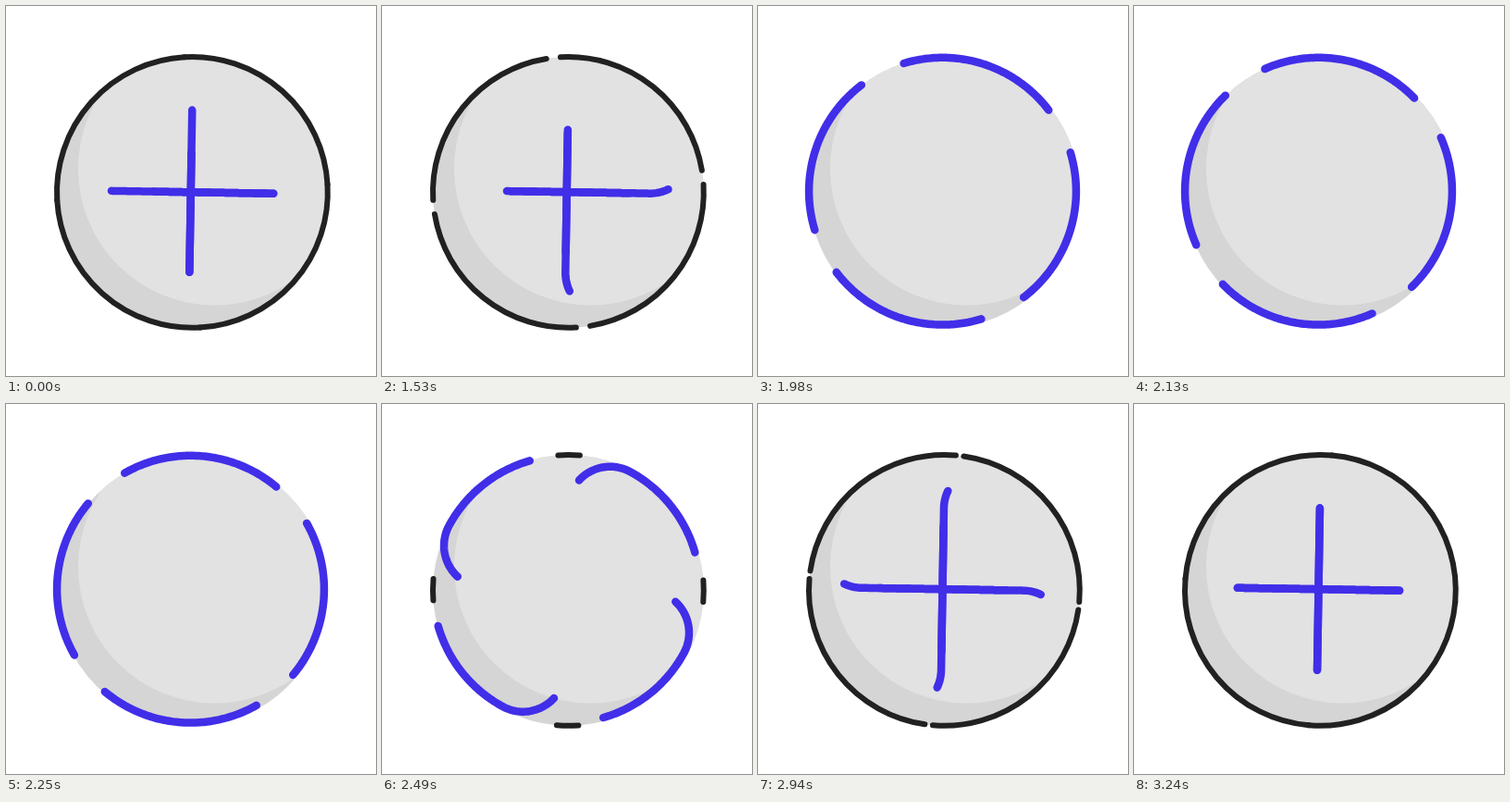
Animation of 400 by 400 pixels, one loop 3390 ms. Source, as an HTML page with a canvas:

```html
<!DOCTYPE html>
<html lang="en">
<head>
<meta charset="utf-8">
<title>Plus</title>
<style>
html, body { margin: 0; width: 100%; height: 100%; overflow: hidden; background: #fff; }
canvas { display: block; width: 400px; height: 400px; }
</style>
</head>
<body>
<canvas id="stage" width="400" height="400"></canvas>
<script>
const ctx = document.getElementById('stage').getContext('2d');
const LOOP = 3390, STEP = 30, HOLD = 1500, MOVE = 1740;
const TAU = Math.PI * 2, DEG = Math.PI / 180;
const BLUE = '#412ee8', INK = '#222122', FACE = '#e2e2e2', SHADE = '#d5d5d5';

// Closed track: a straight bar, a small bend, a rim arc and a bend back.
const CX = 199.5, CY = 200.2, RIM = 144.4, HALF = 87.6, TILT = 0.95 * DEG;
const BEND = (RIM * RIM - HALF * HALF) / (2 * RIM);
const JOIN = Math.atan2(BEND, HALF);
const BEND_LEN = BEND * (Math.PI / 2 + JOIN);
const ARC_LEN = RIM * (Math.PI - 2 * JOIN);
const TRACK = 2 * HALF + 2 * BEND_LEN + ARC_LEN;

const MID = 201.4, RING = 146.4;

// Keys: [time, value, speed]
const TRAVEL = [[0, 0, 0.7], [30, 21.2, 0.8], [480, 296, 0.2], [750, 328, 0.2],
  [990, 468.9, 0.8], [1260, 623.6, 0.25], [MOVE, TRACK, 0.005]];
const ERASE = [[0, 0, 0.2], [30, 6, 0.2], [390, 90, 0.2]];
const GROW = [[900, 0, 0], [990, 9.2, 0.2], [1260, 69.8, 0.15], [1620, 90, 0]];

const clamp = x => Math.max(0, Math.min(1, x));

function curve(keys, t) {
  if (t <= keys[0][0]) return keys[0][1];
  for (let i = 1; i < keys.length; i++) {
    const [t0, a, va] = keys[i - 1], [t1, b, vb] = keys[i];
    if (t > t1) continue;
    const d = t1 - t0, s = (t - t0) / d, r = 1 - s;
    return r * r * ((1 + 2 * s) * a + s * d * va) + s * s * ((1 + 2 * r) * b - r * d * vb);
  }
  return keys[keys.length - 1][1];
}

function bendPoint(q) {
  const a = q / BEND;
  return [HALF + BEND * Math.sin(a), BEND * (Math.cos(a) - 1)];
}

function trackPoint(p) {
  p = ((p + HALF) % TRACK + TRACK) % TRACK;
  if (p < 2 * HALF) return [p - HALF, 0];
  p -= 2 * HALF;
  if (p < BEND_LEN) return bendPoint(p);
  p -= BEND_LEN;
  if (p < ARC_LEN) {
    const a = JOIN + p / RIM;
    return [RIM * Math.cos(a), -RIM * Math.sin(a)];
  }
  const [x, y] = bendPoint(BEND_LEN - (p - ARC_LEN));
  return [-x, y];
}

function strand(turn, tail, head, dx, dy) {
  ctx.save();
  ctx.translate(CX + dx, CY + dy);
  ctx.rotate(turn * Math.PI / 2 + TILT);
  ctx.beginPath();
  const n = 90;
  for (let i = 0; i <= n; i++) ctx.lineTo(...trackPoint(tail + (head - tail) * i / n));
  ctx.stroke();
  ctx.restore();
}

function disc(x, y, r, color) {
  ctx.fillStyle = color;
  ctx.beginPath();
  ctx.arc(x, y, r, 0, TAU);
  ctx.fill();
}

function face() {
  disc(MID, MID, RING, SHADE);
  ctx.save();
  ctx.beginPath();
  ctx.arc(MID, MID, RING, 0, TAU);
  ctx.clip();
  disc(225.5, 176, 147.5, FACE);
  ctx.restore();
}

// Four equal outline pieces, angles counter-clockwise in degrees.
function outline(from, to) {
  if (to - from <= 0) return;
  for (let k = 0; k < 4; k++) {
    ctx.beginPath();
    ctx.arc(MID, MID, RING, -(from + 90 * k) * DEG, -(to + 90 * k) * DEG, true);
    ctx.stroke();
  }
}

function draw(ms) {
  const t = Math.max(0, Math.min(MOVE, Math.floor(ms / STEP) * STEP - HOLD));
  ctx.fillStyle = '#fff';
  ctx.fillRect(0, 0, 400, 400);
  face();

  ctx.lineCap = ctx.lineJoin = 'round';
  ctx.strokeStyle = INK;
  ctx.lineWidth = 6;
  if (t < 600) outline(3.3 + curve(ERASE, t), 93.3);
  else outline(-4.9, curve(GROW, t) - 4.9);

  ctx.strokeStyle = BLUE;
  ctx.lineWidth = 8.5;
  const u = curve(TRAVEL, t);
  const shift = 1 - clamp(u / 200);
  const lag = 46 * (1 - clamp((t - 30) / 240));
  for (let k = 0; k < 4; k++) {
    const flat = k % 2 === 0;
    // The opposite pair starts shorter, hidden under the leading pair.
    strand(k, u - HALF, u + HALF - (k > 1 ? lag : 0),
      shift * (flat ? 2.1 : 0.3), shift * (flat ? 1.1 : 0));
  }
}

const start = performance.now();
function tick() {
  draw((performance.now() - start) % LOOP);
  requestAnimationFrame(tick);
}
tick();
</script>
</body>
</html>
```
